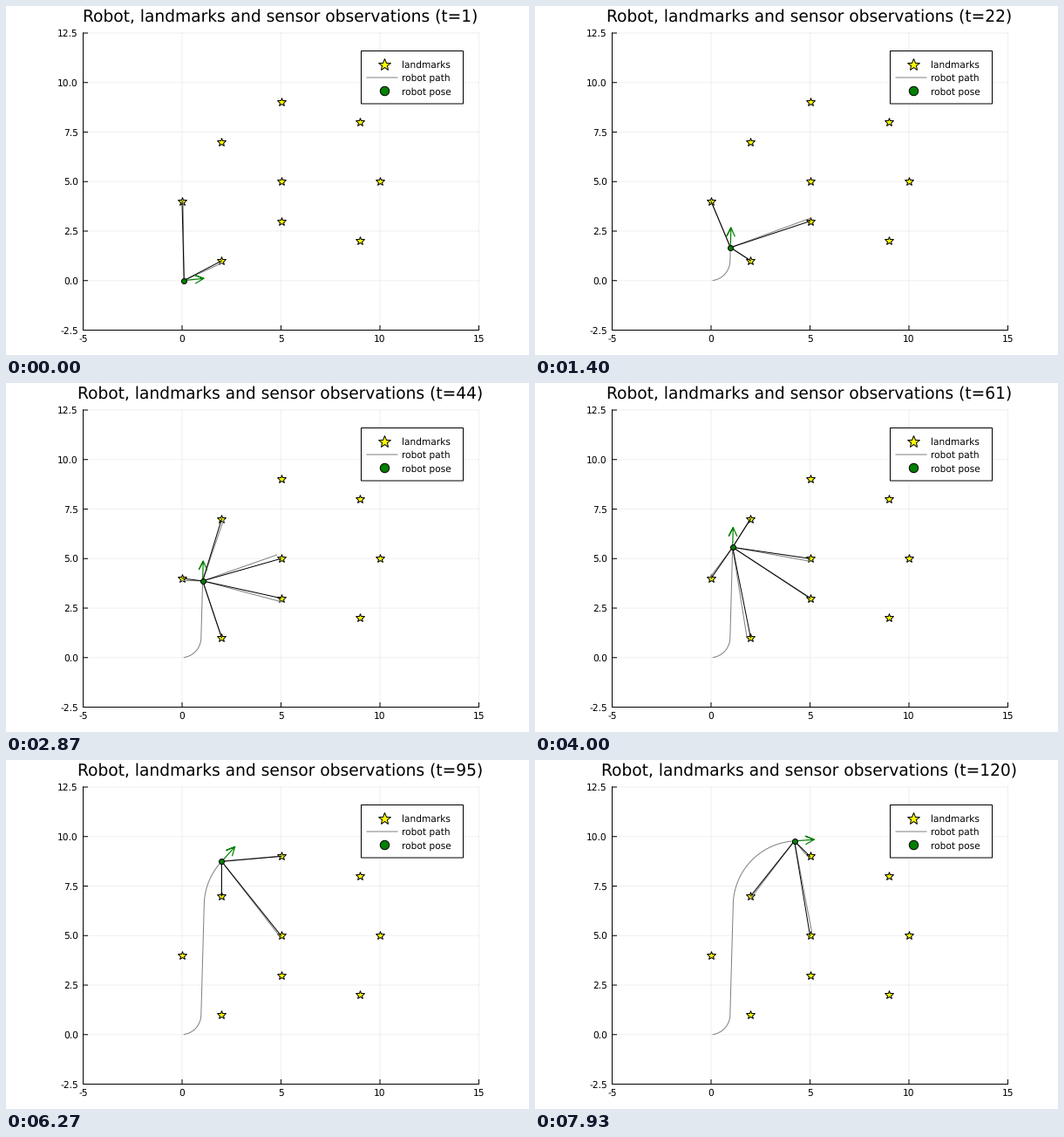
Write a matplotlib script that moves like this. It is 600x400 px and loops after 8000 ms.

```python
import numpy as np
import matplotlib.pyplot as plt
from matplotlib.animation import FuncAnimation
from matplotlib.patches import Rectangle

plt.rcParams["font.family"] = "DejaVu Sans"
plt.rcParams["text.hinting"] = "none"

W, H, DPI = 600, 400, 100
PT = 72 / DPI                # points per pixel
STEPS = 120
INTERVAL = 66.63             # ms, just under 8000 / 120
SCALE, X0, Y0 = 22.7, 202.0, 314.75
LEFT, RIGHT, TOP, BOTTOM = 88.5, 542.5, 31.0, 371.5
STEP_LENGTH, SENSOR_RANGE = 0.1, 5.0
RANGE_NOISE, BEARING_NOISE = 0.1, 0.045
GRAY = "#808080"

LANDMARKS = np.array([(2, 1), (0, 4), (2, 7), (9, 2), (10, 5),
                      (9, 8), (5, 5), (5, 3), (5, 9)], float)


def unit(a):
    return np.stack([np.cos(a), np.sin(a)], axis=-1)


def to_px(points):
    p = np.asarray(points, float)
    return X0 + SCALE * p[..., 0], Y0 - SCALE * p[..., 1]


def heading(t):
    """Left turn, straight run, then a wide right turn."""
    if t <= 15:
        return 0.099 * t
    if t <= 72:
        return 1.543
    return 1.535 - 0.0305 * (t - 72)


headings = np.array([heading(t) for t in range(1, STEPS + 1)])
poses = STEP_LENGTH * np.cumsum(unit(headings), axis=0)

# True and noisy range and bearing of every landmark at every step
offsets = LANDMARKS - poses[:, None]
ranges = np.hypot(offsets[..., 0], offsets[..., 1])
bearings = np.arctan2(offsets[..., 1], offsets[..., 0])
rng = np.random.default_rng(7)
noisy_ranges = ranges + rng.normal(0, RANGE_NOISE, ranges.shape)
noisy_bearings = bearings + rng.normal(0, BEARING_NOISE, ranges.shape)
readings = poses[:, None] + noisy_ranges[..., None] * unit(noisy_bearings)

fig = plt.figure(figsize=(W / DPI, H / DPI), dpi=DPI, facecolor="white")
ax = fig.add_axes([0, 0, 1, 1])
ax.set_xlim(0, W)
ax.set_ylim(H, 0)
ax.axis("off")


def line(x=(), y=(), color="black", width=1.0, z=3, **kw):
    return ax.plot(x, y, color=color, lw=width * PT, zorder=z, snap=False, **kw)[0]


def marker(x, y, shape, color, size, z):
    return ax.plot(x, y, shape, ms=size * PT, mfc=color, mec="black",
                   mew=PT, zorder=z, snap=False)[0]


def label(x, y, text, size=10.67, ha="center"):
    return ax.text(x, y, text, fontsize=size * PT, ha=ha, va="baseline", zorder=9)


def draw_axes():
    for v in range(-5, 16, 5):
        x = X0 + SCALE * v
        line((x, x), (TOP, BOTTOM), z=1, alpha=0.06)
        line((x, x), (BOTTOM, BOTTOM - 5), z=2)
        label(x, 385, str(v))
    for v in np.arange(-2.5, 12.6, 2.5):
        y = Y0 - SCALE * v
        line((LEFT, RIGHT), (y, y), z=1, alpha=0.06)
        line((LEFT, LEFT + 5), (y, y), z=2)
        label(83, y + 4, f"{v:.1f}", ha="right")
    line((LEFT, LEFT, RIGHT), (TOP, BOTTOM, BOTTOM), z=2)


def draw_legend():
    ax.add_patch(Rectangle((407.5, 51.5), 117, 60.5, fc="white", ec="black",
                           lw=PT, zorder=7, snap=False))
    marker(434.2, 66.9, "*", "yellow", 14, 8)
    line((414, 449), (82, 82), GRAY, z=8)
    marker(434.2, 97.2, "o", "green", 10.4, 8)
    for i, text in enumerate(("landmarks", "robot path", "robot pose")):
        label(454, 71 + 15.2 * i, text, ha="left")


draw_axes()
draw_legend()
marker(*to_px(LANDMARKS), "*", "yellow", 10.8, 3)
title = label(315, 17, "", 18.7)
path = line(color=GRAY, z=4)
sensed = line(color=GRAY, z=4)
actual = line(z=5)
arrow = line(color="green", width=1.2, z=5)
robot = marker([], [], "o", "green", 6, 6)


def spokes(center, ends):
    """Separate segments from center to each end."""
    gap = (np.nan, np.nan)
    return to_px([p for e in ends for p in (center, e, gap)])


def arrow_points(center, a):
    d = unit(a)
    side = np.array([-d[1], d[0]]) * 4.6 / SCALE
    tip = center + d
    back = tip - d * 9.6 / SCALE
    return to_px([center, tip, back + side, tip, back - side])


def update(i):
    pos = poses[i]
    seen = ranges[i] < SENSOR_RANGE
    title.set_text(f"Robot, landmarks and sensor observations (t={i + 1})")
    path.set_data(*to_px(poses[:i + 1]))
    sensed.set_data(*spokes(pos, readings[i][seen]))
    actual.set_data(*spokes(pos, LANDMARKS[seen]))
    arrow.set_data(*arrow_points(pos, headings[i]))
    robot.set_data(*to_px([pos]))
    return title, path, sensed, actual, arrow, robot


anim = FuncAnimation(fig, update, frames=STEPS, interval=INTERVAL,
                     init_func=lambda: update(0), repeat=True,
                     repeat_delay=0, blit=False)
plt.show()
```
